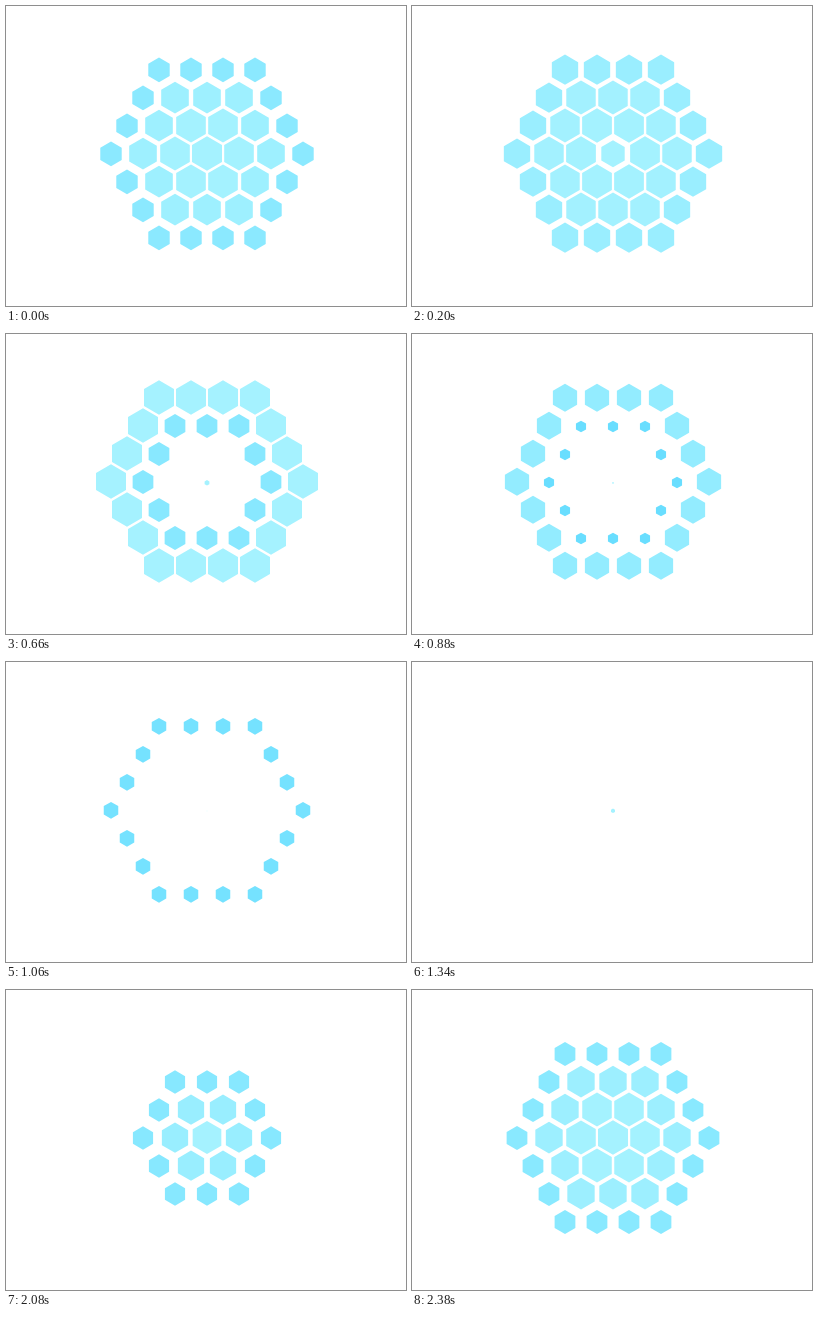
Recreate the animation shown at these times as an HTML page with a canvas. Size 400 by 300 pixels, loop 2.4 s.

```html
<!DOCTYPE html>
<html lang="en">
<head>
<meta charset="utf-8">
<title>Hexagon loader</title>
<style>
  html, body { margin: 0; width: 100%; height: 100%; overflow: hidden; background: #fff; }
  canvas { display: block; }
</style>
</head>
<body>
<canvas id="stage" width="400" height="300"></canvas>
<script>
const ctx = document.getElementById('stage').getContext('2d');
const PERIOD = 2400, HALF = PERIOD / 2;
const DELAYS = [0, 180, 412, 696];
const MIN_RING_SCALE = 0.325;
const PALE = [165, 242, 255], DEEP = [105, 222, 255];
const CORNERS = [[0, -17.3], [15, -8.6], [15, 8.6], [0, 17.3], [-15, 8.6], [-15, -8.6]];

const cells = [];
for (let r = -3; r <= 3; r++) {
  for (let q = -3; q <= 3; q++) {
    const ring = Math.max(Math.abs(q), Math.abs(r), Math.abs(q + r));
    if (ring <= 3) cells.push({ ring, x: 201 + 32 * q + 16 * r, y: 149 + 28 * r });
  }
}

const bezier = (a, b, u) => 3 * (1 - u) * (1 - u) * u * a + 3 * (1 - u) * u * u * b + u * u * u;

// Same curve as the CSS "ease" keyword.
function ease(x) {
  let lo = 0, hi = 1;
  for (let i = 0; i < 24; i++) {
    const mid = (lo + hi) / 2;
    if (bezier(0.25, 0.25, mid) < x) lo = mid; else hi = mid;
  }
  return bezier(0.1, 1, lo);
}

function pulse(time) {
  const t = (time + PERIOD) % PERIOD;
  const shrink = t < HALF ? ease(t / HALF) : 1 - ease(t / HALF - 1);
  return 1 - 0.99 * shrink;
}

function ringColor(ring, scale) {
  const k = ring ? Math.min(1, (1 - scale) / 0.65) : 0;
  return `rgb(${PALE.map((c, i) => Math.round(c + (DEEP[i] - c) * k))})`;
}

function drawHexagon({ x, y }, scale) {
  ctx.beginPath();
  // Each hexagon sits 1.5px above the point it scales around.
  for (const [dx, dy] of CORNERS) ctx.lineTo(x + dx * scale, y + (dy - 1.5) * scale);
  ctx.fill();
}

function draw() {
  const time = performance.now() % PERIOD;
  const scales = DELAYS.map(delay => pulse(time - delay));
  ctx.clearRect(0, 0, 400, 300);
  for (const cell of cells) {
    const scale = scales[cell.ring];
    if (cell.ring && scale < MIN_RING_SCALE) continue;
    ctx.fillStyle = ringColor(cell.ring, scale);
    drawHexagon(cell, scale);
  }
  requestAnimationFrame(draw);
}
draw();
</script>
</body>
</html>
```
